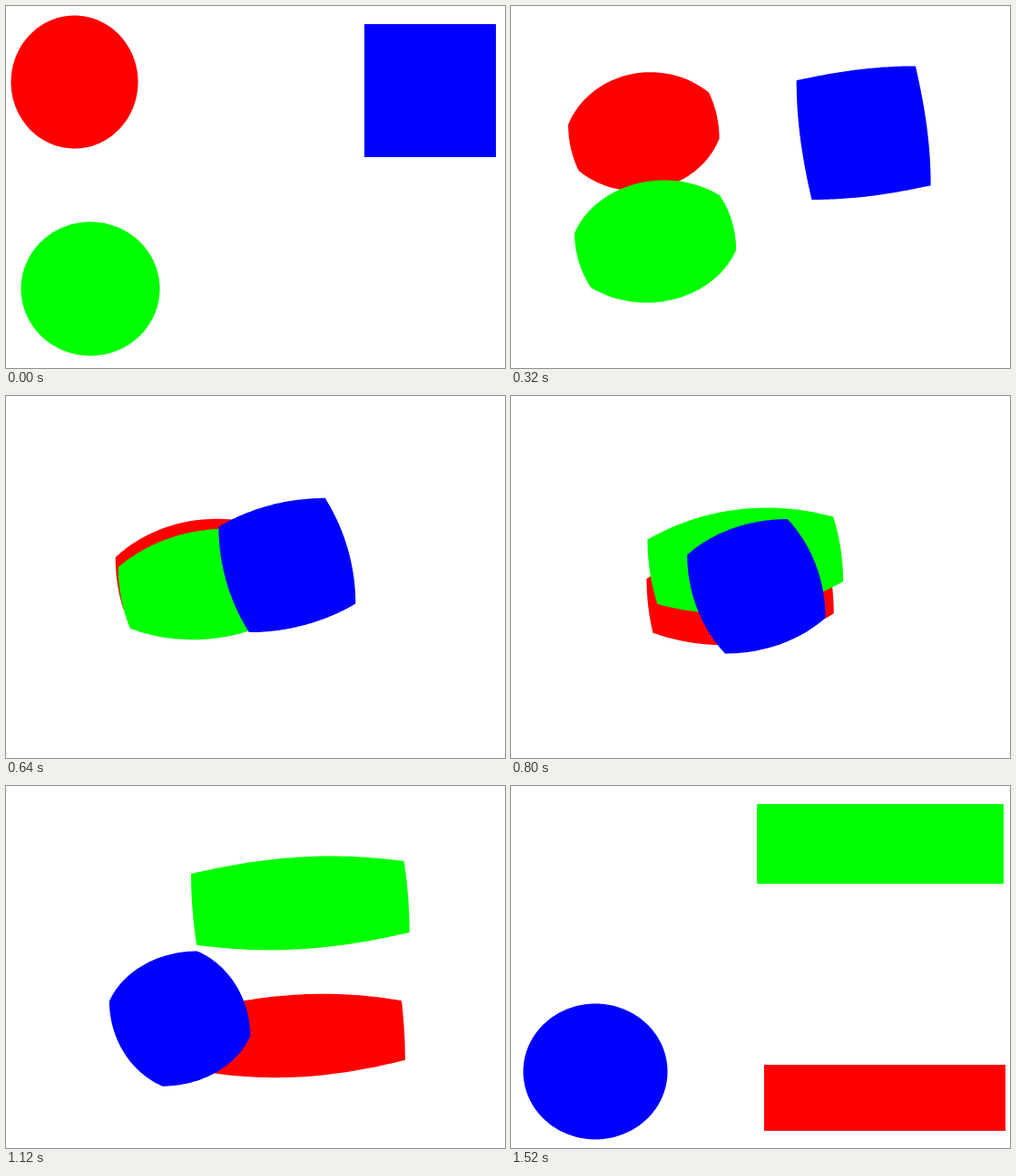
Recreate the animation shown at these times as an HTML page with a canvas. Size 550 px wide and 400 px high, loop 1.6 s.

```html
<!DOCTYPE html>
<html lang="en">
<head>
<meta charset="utf-8">
<title>Shape morph</title>
<style>
  html, body { margin: 0; width: 100%; height: 100%; overflow: hidden; background: #fff; }
  canvas { display: block; }
</style>
</head>
<body>
<canvas id="stage" width="550" height="400"></canvas>
<script>
const ctx = document.getElementById('stage').getContext('2d');
const STEP_MS = 80;
const STEPS = 20;
const EDGE_POINTS = 40;

// Oval: centre and radii. Box: left, top, right, bottom.
// "corner" is the oval angle, measured from its left and right ends,
// that meets the box's bottom-left and top-right corners.
const shapes = [
  { color: '#f00', oval: [75.5, 84, 70, 73.5], box: [279, 308, 545, 381], corner: 37.8 },
  { color: '#0f0', oval: [93, 312.5, 76.5, 74], box: [271, 20, 543, 108], corner: 45.4 },
  { color: '#00f', oval: [93, 315.5, 79.5, 75], box: [395, 20, 540, 167], corner: 90, toOval: true }
];

const mix = (a, b, t) => a + (b - a) * t;

function ovalPoint([cx, cy, rx, ry], degrees) {
  const a = degrees * Math.PI / 180;
  return [cx + rx * Math.cos(a), cy + ry * Math.sin(a)];
}

function drawShape({ color, oval, box: [left, top, right, bottom], corner, toOval }, t) {
  const boxAmount = toOval ? 1 - t : t;
  const corners = [[left, top], [right, top], [right, bottom], [left, bottom]];
  const angles = [180, 360 - corner, 360, 540 - corner, 540];

  ctx.beginPath();
  corners.forEach((from, i) => {
    const to = corners[(i + 1) % 4];
    for (let k = 0; k < EDGE_POINTS; k++) {
      const u = k / EDGE_POINTS;
      const [x, y] = ovalPoint(oval, mix(angles[i], angles[i + 1], u));
      ctx.lineTo(
        mix(x, mix(from[0], to[0], u), boxAmount),
        mix(y, mix(from[1], to[1], u), boxAmount)
      );
    }
  });
  ctx.closePath();
  ctx.fillStyle = color;
  ctx.fill();
}

function render() {
  const step = Math.floor(performance.now() / STEP_MS) % STEPS;
  ctx.fillStyle = '#fff';
  ctx.fillRect(0, 0, 550, 400);
  shapes.forEach(shape => drawShape(shape, step / (STEPS - 1)));
  requestAnimationFrame(render);
}

render();
</script>
</body>
</html>
```
